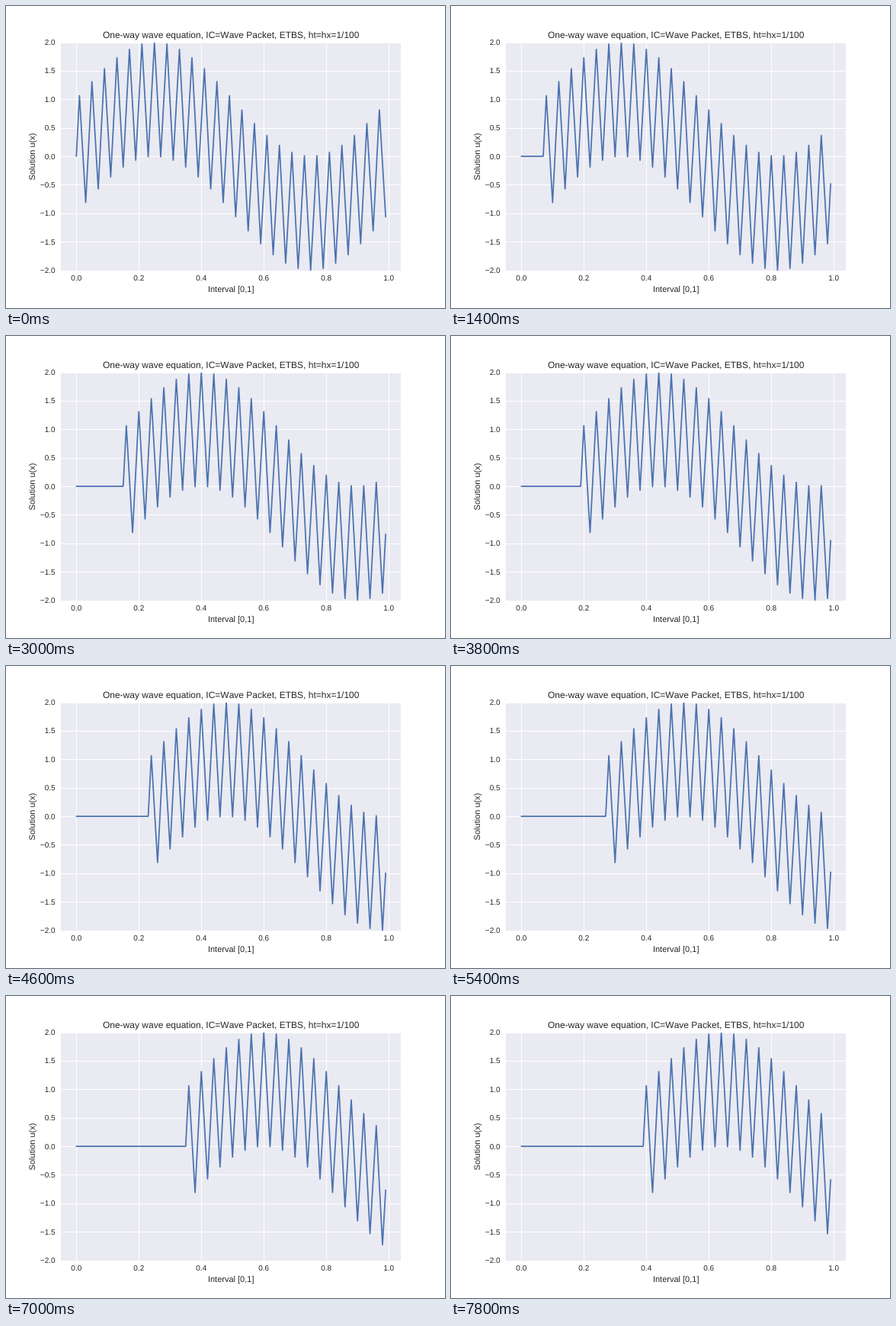
An HTML page that plays this animation: 576x396 px, repeating every 8000 ms.

```html
<!DOCTYPE html>
<html lang="en">
<head>
<meta charset="utf-8">
<title>One-way wave equation</title>
<style>
  html, body { margin: 0; width: 100%; height: 100%; overflow: hidden; background: #fff; }
  svg { display: block; width: 576px; height: 396px; }
  text {
    font-family: "Liberation Sans", Arial, sans-serif;
    font-size: 10px;
    font-kerning: none;
    fill: #262626;
    text-anchor: middle;
    text-rendering: geometricPrecision;
  }
  .label { font-size: 11px; }
  .title { font-size: 12px; }
  .ytick { text-anchor: end; }
</style>
</head>
<body>
<svg viewBox="0 0 576 396">
  <defs><clipPath id="area"><rect x="72" y="48" width="446" height="299"/></clipPath></defs>
  <rect x="72" y="48" width="446" height="299" fill="#eaeaf2"/>
  <g clip-path="url(#area)" fill="none">
    <path id="grid" stroke="#fff"/>
    <path id="wave" stroke="#4c72b0" stroke-width="1.75" stroke-linecap="round" stroke-linejoin="round"/>
  </g>
  <g id="ticks"></g>
  <text class="title" x="295.2" y="42">One-way wave equation, IC=Wave Packet, ETBS, ht=hx=1/100</text>
  <text class="label" x="295.2" y="375">Interval [0,1]</text>
  <text class="label" transform="translate(38 197.5) rotate(-90)">Solution u(x)</text>
</svg>
<script>
const POINTS = 100, STEP = 200, LOOP = 8000;
const $ = id => document.getElementById(id);

const px = x => 72 + (x + 0.0495) * 446.4 / 1.089;
const py = y => 197.01 - y * 74.745;
const snap = v => Math.floor(v + 0.5) + 0.5;
const packet = x => Math.sin(2 * Math.PI * x) + Math.sin(50 * Math.PI * x);

function addTick(value, x, y, cls) {
  const el = document.createElementNS('http://www.w3.org/2000/svg', 'text');
  el.setAttribute('x', x);
  el.setAttribute('y', y);
  el.setAttribute('class', cls);
  el.textContent = value.toFixed(1).replace('-', '\u2212');
  $('ticks').append(el);
}

function drawAxes() {
  let grid = '';
  for (let i = 0; i <= 5; i++) {
    const x = px(i / 5);
    grid += `M${snap(x)} 48V347`;
    addTick(i / 5, x, 360, 'xtick');
  }
  for (let i = -4; i <= 4; i++) {
    const y = py(i / 2);
    grid += `M72 ${snap(y)}H518`;
    addTick(i / 2, 64.6, Math.round(y + 3.5), 'ytick');
  }
  $('grid').setAttribute('d', grid);
}

// The packet moves right by one grid cell per step, leaving zeros behind.
function draw(time) {
  const shift = Math.floor((time % LOOP) / STEP);
  const points = Array.from({ length: POINTS }, (_, j) => {
    const u = j > shift ? packet((j - shift) / POINTS) : 0;
    return `${px(j / POINTS).toFixed(2)} ${py(u).toFixed(2)}`;
  });
  $('wave').setAttribute('d', 'M' + points.join('L'));
}

drawAxes();
draw(0);
const start = performance.now();
(function tick() {
  draw(performance.now() - start);
  requestAnimationFrame(tick);
})();
</script>
</body>
</html>
```
